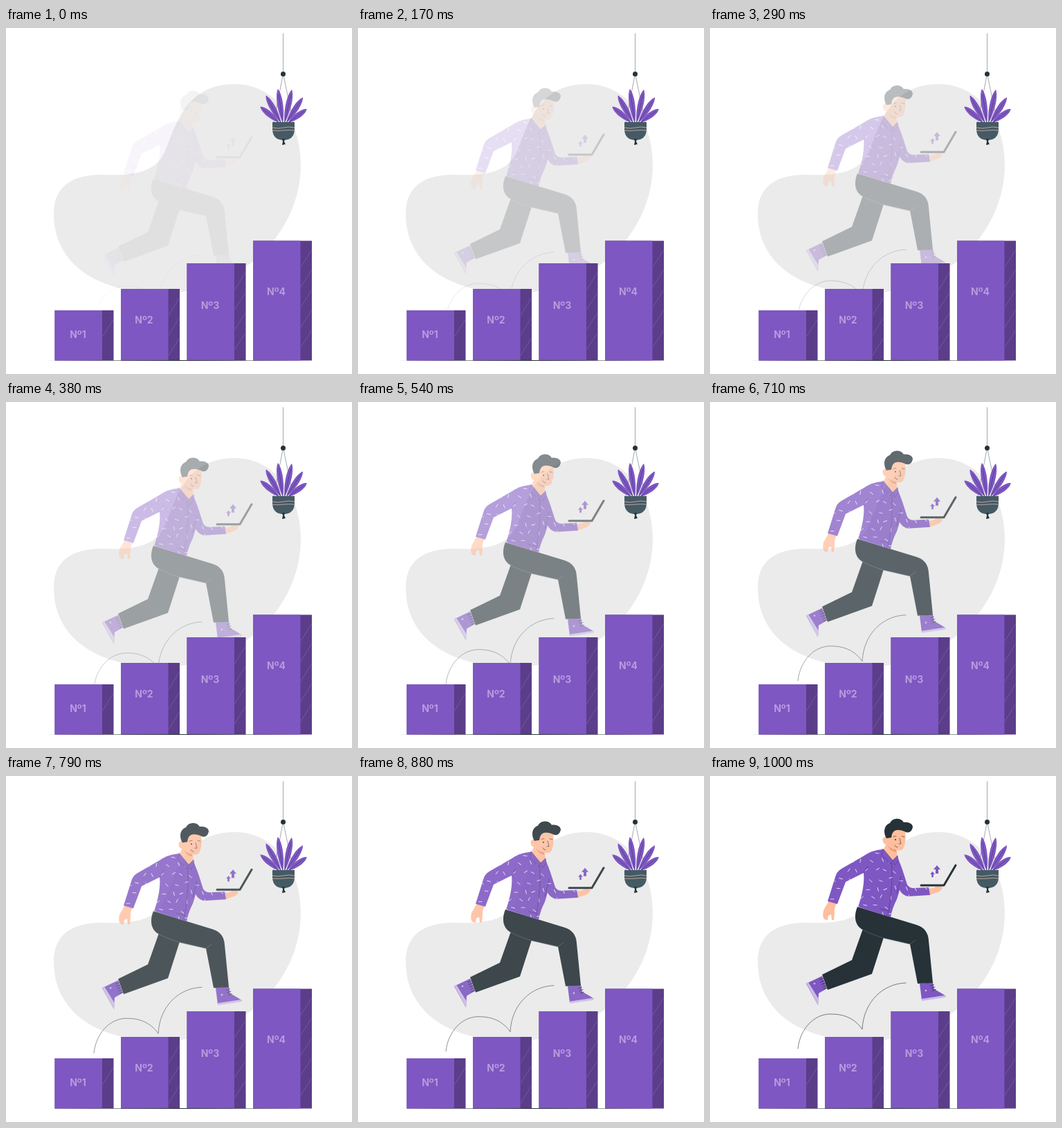
An HTML page that plays this animation: 500x500 px, repeating every 1.04 s.

```html
<!DOCTYPE html>
<html lang="en">
<head>
<meta charset="utf-8">
<title>Climbing the steps</title>
<style>
  html, body { margin: 0; width: 100%; height: 100%; overflow: hidden; background: #fff; }
  svg { display: block; width: 100%; height: 100%; }
  text { font: 700 14px Inter, sans-serif; fill: #b69ddd; text-anchor: middle; }
  .purple { fill: #7e57c2; }
  .dark { fill: #263238; }
  .skin { fill: #ffbe9d; }
  .pale { fill: #cbbbe7; }
  .line { fill: none; stroke: #263238; stroke-width: .6; stroke-linecap: round; }
  .laces { fill: none; stroke: #263238; stroke-width: 6; stroke-dasharray: .7 3; }
  .seam { fill: none; stroke: #4b3474; stroke-width: .6; }
  .fleck { fill: none; stroke: #e8dff5; stroke-width: .9; stroke-linecap: round; }
</style>
</head>
<body>
<svg viewBox="0 0 500 500">
  <defs>
    <path id="arrow" d="M0 0L5 6H2V12H-2V6H-5Z"/>
    <path id="sleeve" d="M271 118C277 130 281 145 285 157Q288 162 294 162L316 161L318 172L286 174C277 172 273 165 269 153Z"/>
    <path id="shirt" d="M249 106C240 107 231 109 223 115L190 134Q183 138 181 146L170 181L184 185L196 153L222 140Q224 160 214 189L261 204Q263 192 270 178Q276 161 276 147Q275 130 271 119Z"/>
    <clipPath id="cloth"><use href="#shirt"/><use href="#sleeve"/></clipPath>
  </defs>

  <path fill="#ebebeb" d="M330 81C388 81 426 133 426 197C426 300 335 383 226 383C130 383 69 340 69 268C69 232 92 212 138 212C185 214 216 208 229 180C244 148 256 81 330 81Z"/>

  <g id="runner">
    <path class="line" d="M127 394C130 366 150 343 176 344C198 344 212 354 220 366C222 326 250 300 283 299"/>

    <!-- rear leg -->
    <path class="purple" d="M139 300L162 289L169 307L157 314L156 331Z"/>
    <path class="pale" d="M139 299L142 298L157 322L156 331Z"/>
    <path class="laces" d="M161 293L167 308"/>
    <circle cx="151" cy="300" r="1.3" class="pale"/>
    <path class="dark" d="M222 218L205 266L162 287L170 309L234 286L252 230Z"/>

    <!-- front leg -->
    <path class="purple" d="M303 300L322 298L324 308L333 313L341 318L306 324Z"/>
    <path class="pale" d="M306 322L339 317Q342 318 340 320L306 325Z"/>
    <path class="laces" d="M321 302L325 312"/>
    <circle cx="312" cy="310" r="1.3" class="pale"/>
    <path class="dark" d="M213 189L262 204L298 215Q315 220 316 238L322 299L300 300L289 243L250 234L222 223C208 216 208 201 213 189Z"/>
    <path d="M219 221Q226 226 250 234L289 243L297 237" fill="none" stroke="#66737a" stroke-width=".6"/>

    <!-- laptop -->
    <path class="skin" d="M315 163L323 162Q328 157 336 161Q334 167 326 169L317 172Z"/>
    <path d="M305 158L338 158L355 129" fill="none" stroke="#263238" stroke-width="3" stroke-linejoin="round" stroke-linecap="round"/>
    <use href="#arrow" class="purple" transform="translate(328 129)"/>
    <use href="#arrow" class="purple" transform="translate(321.500 138) scale(.68)"/>

    <!-- torso and arms -->
    <path class="skin" d="M172 180L183 184Q179 191 180 198L179 208L176 208L175 200L171 202L170 208Q161 209 164 194Z"/>
    <use href="#sleeve" class="purple"/>
    <use href="#shirt" class="purple"/>
    <g id="flecks" class="fleck" clip-path="url(#cloth)"></g>
    <path class="seam" d="M222 140Q225 134 228 130M262 124Q266 150 257 202M246 192L258 195M276 145L270 170"/>

    <!-- head -->
    <path class="skin" d="M254 83L264 77L282 78Q284 94 280 103Q278 109 269 107L271 115L264 122L250 109L254 99C248 97 248 87 254 88Z"/>
    <path d="M257 101Q262 106 269 107L270 110Q261 109 257 101Z" fill="#eb996e"/>
    <path class="purple" stroke="#4b3474" stroke-width=".5" d="M250 105L264 122L261 127L248 114ZM264 122L271 115L272 122L267 129Z"/>
    <path class="dark" d="M255 90C250 82 251 71 260 68C264 60 276 60 280 67C287 66 293 69 293 74C291 82 286 83 281 80C276 78 271 77 267 79Q263 81 262 89Z"/>
    <path class="line" d="M265 88Q267 86 269 87M277 87L281 88M274 90L276 98L273 98M267 100Q268 103 271 103"/>
    <path d="M268 92H279" stroke="#263238" stroke-width="2" stroke-linecap="round" stroke-dasharray="0 11"/>
  </g>

  <g id="bars"></g>
  <path class="dark" d="M55 480.500L250 480L445 480.500L250 481Z"/>

  <!-- hanging plant -->
  <path class="line" stroke-opacity=".7" d="M400.500 8V66L387 136M400.500 66L415 136"/>
  <circle cx="400.500" cy="66.500" r="3.500" class="dark"/>
  <g id="leaves"></g>
  <path fill="#455a64" d="M385 136H417V147Q416 162 401 162Q386 162 385 147Z"/>
  <path d="M385 144Q393 146 401 144T417 144M385 148Q393 149 401 148T417 148" fill="none" stroke="#d6b8ac" stroke-width=".8"/>
  <path class="dark" d="M399 160H403L402 164L404 168L399 169L400 164Z"/>
</svg>

<script>
const make = (id, count, part) => {
  document.getElementById(id).innerHTML = Array.from({ length: count }, (_, i) => part(i)).join('');
};

const tops = [408, 377, 340, 307.5];
make('bars', tops.length, i => {
  const x = 70.5 + 95.5 * i, top = tops[i];
  let grain = '';
  for (let y = top + 38; y < 474; y += 29) grain += `M${x + 69} ${y}l15 -24`;
  return `<path fill="#5b3d8a" d="M${x} ${top}h85V480.5h-85Z"/>
    <path class="purple" d="M${x} ${top}h68.5V480.5h-68.5Z"/>
    <path d="${grain}" fill="none" stroke="#8d70b8" stroke-width=".5"/>
    <text x="${x + 33.5}" y="${448 - 20.8 * i}">Nº${i + 1}</text>`;
});

// Leaves fan out evenly, the outer ones shorter
make('leaves', 6, i => {
  const angle = -54 + 22.5 * i;
  const len = 50 - 16 * (angle / 58) ** 2;
  return `<g transform="translate(${401 + angle / 9} 137) rotate(${angle * .92})">
    <path class="purple" d="M0 0C-6 ${-len * .4} -5 ${-len * .85} 0 ${-len}C5 ${-len * .85} 6 ${-len * .4} 0 0Z"/>
    <path class="seam" d="M0 0V${-len * .85}"/></g>`;
});

// Printed strokes: a staggered grid with seeded jitter, clipped to the cloth
let seed = 7;
const random = () => (seed = seed * 16807 % 2147483647) / 2147483647;
const COLS = 11, ROWS = 8;
make('flecks', COLS * ROWS, i => {
  const col = i % COLS, row = Math.floor(i / COLS);
  const x = 168 + (col + row % 2 / 2) * 14 + random() * 5;
  const y = 108 + row * 13 + random() * 5;
  return `<path transform="translate(${x} ${y}) rotate(${random() * 180})" d="M-2.5 0h5"/>`;
});

// The runner rises while fading in, at 24 steps per second
const LOOP = 1040, STEPS = 24, RISE = 30;
const runner = document.getElementById('runner');
function draw(now) {
  const t = Math.floor(now % LOOP / 10) * 10;
  const step = Math.floor((t + 4.9) * STEPS / 1000);
  const p = Math.min(STEPS, Math.max(1, step)) / STEPS;
  runner.setAttribute('opacity', p ** .93);
  runner.setAttribute('transform', `translate(0 ${RISE * (1 - p)})`);
}
const start = performance.now();
function tick() {
  draw(performance.now() - start);
  requestAnimationFrame(tick);
}
tick();
</script>
</body>
</html>
```
